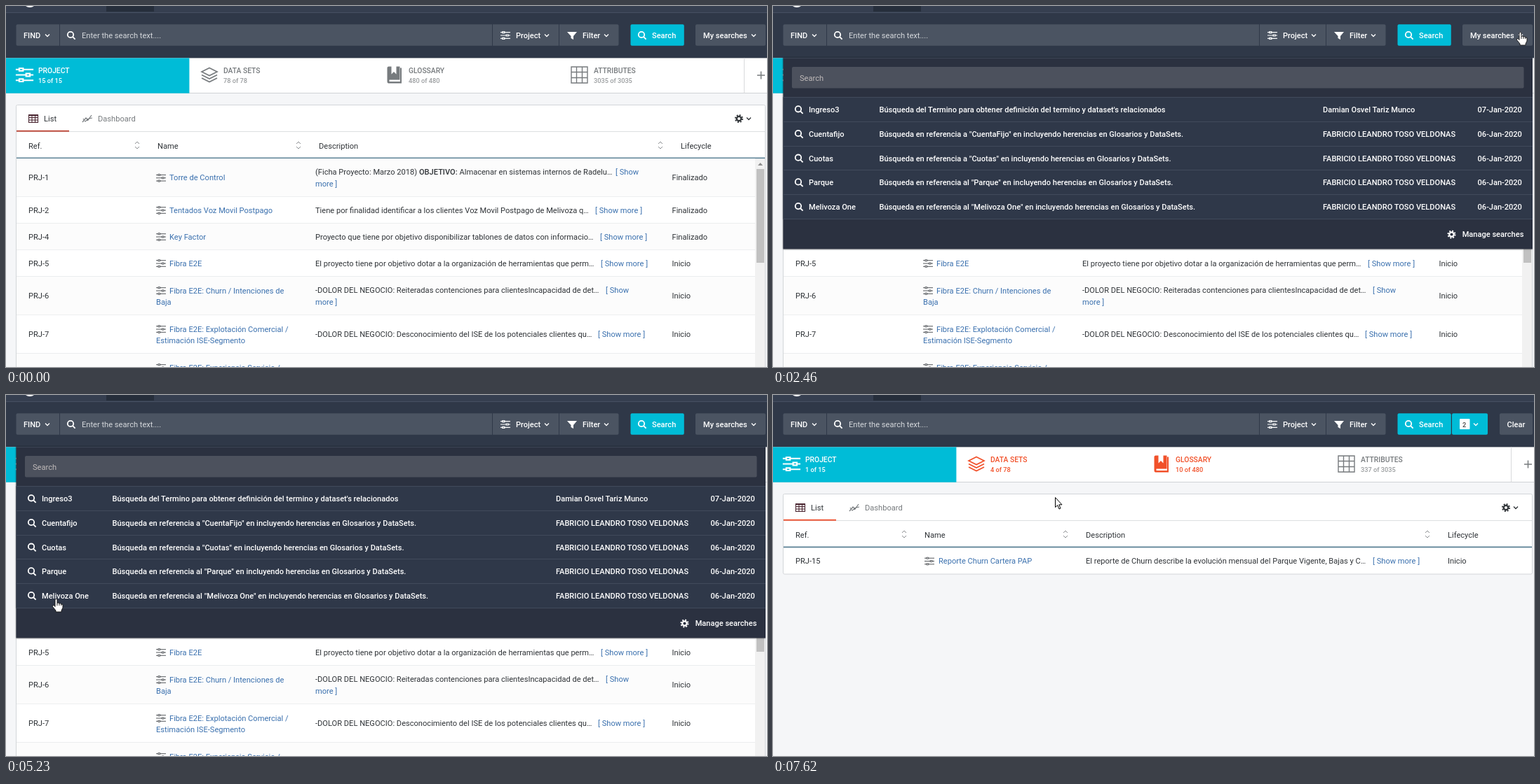
An HTML page for the animation above (8000 ms loop, 1085 by 516 pixels).

```html
<!DOCTYPE html>
<html lang="en">
<head>
<meta charset="utf-8">
<style>
html, body { margin: 0; width: 100%; height: 100%; overflow: hidden; background: #f5f6f8; }
svg { display: block; width: 1085px; height: 516px; }
text { font: 11.1px Roboto, sans-serif; fill: currentColor; white-space: pre; }
.m { font-weight: 500; font-size: 11.05px; }
.title { font-weight: 500; font-size: 10.3px; }
.count { font-weight: 500; font-size: 9.2px; }
.icon { fill: none; stroke: currentColor; }
#panel { filter: drop-shadow(0 0 1.2px #0008); }
#overlay { clip-path: inset(0 2px 0 0) view-box; }
</style>
</head>
<body>
<svg id="stage" viewBox="0 0 1085 516"></svg>
<script>
const LOOP = 8000;
const CYAN = '#00bcd7', LINK = '#3a70ae', INK = '#2f3337', GREY = '#777b7e', ORANGE = '#f1512a', BUTTON = '#4b5462';

const box = (x, y, w, h, fill, extra = '') => `<rect x="${x}" y="${y}" width="${w}" height="${h}" fill="${fill}" ${extra}/>`;
const button = (x, w, fill) => box(x, 26.3, w, 30.4, fill, 'rx="2"');
// y is the middle of the line of text
const text = (x, y, s, color = 'currentColor', cls = '') =>
  `<text x="${x}" y="${y + 4}" class="${cls}" style="fill:${color}">${s}</text>`;
const group = (id, body, color = INK) => `<g id="${id}" style="color:${color}">${body}</g>`;
const icon = (x, y, d, color = 'currentColor', width = 1.3, scale = 1) =>
  `<path class="icon" transform="translate(${x} ${y}) scale(${scale})" d="${d}" style="stroke:${color};stroke-width:${width}"/>`;

// Icons are drawn around their own centre
const chevron = (x, y, c) => icon(x, y, 'M-3-1.5L0 1.5L3-1.5', c);
const lens = (x, y, c = '#fff') => icon(x, y, 'M2.4 2.4L5.6 5.6M3.2-1A4.2 4.2 0 1 1-5.2-1A4.2 4.2 0 1 1 3.2-1', c, 1.8);
const sliders = (x, y, c = '#54585c', scale = 1, w = 1) => icon(x, y,
  'M-7-4.3H-4.2M-1.2-4.3H7M-7 0H1.2M4.2 0H7M-7 4.3H-4.2M-1.2 4.3H7' +
  'M-4.2-5.3H-1.2V-3.3H-4.2ZM1.2-1H4.2V1H1.2ZM-4.2 3.3H-1.2V5.3H-4.2Z', c, w, scale);
const sorter = x => icon(x, 199, 'M-3-2L0-5L3-2M-3 2L0 5L3 2', '#8a8d90', 1);
const gear = (x, y, c) =>
  `<g class="icon" style="stroke:${c}"><circle cx="${x}" cy="${y}" r="3.2" stroke-width="2.2"/>` +
  `<circle cx="${x}" cy="${y}" r="5" stroke-width="2" stroke-dasharray="1.963"/></g>`;
const grid = (x, y, c) => icon(x, y, 'M-11.5-11.5H11.5V11.5H-11.5ZM-4-11.5V11.5M4-11.5V11.5M-11.5-4H11.5M-11.5 4H11.5', c, 1.4);
const layers = (x, y) => icon(x, y, 'M0-10L11-4.5L0 1L-11-4.5ZM-11 0L0 5.5L11 0M-11 4.5L0 10L11 4.5', 'currentColor', 1.7);
const book = (x, y) =>
  `<path transform="translate(${x} ${y})" fill="currentColor" d="M-8-12H-4V-1L-.5-4.5L3-1V-12H8V7H-7V9.5H8.5V-10H10.5V12H-8Q-10 12-10 9V-10Q-10-12-8-12Z"/>`;

const tab = (id, x, title, count, art, color) =>
  group(id, art + text(x, 92.2, title, 'currentColor', 'title') +
    `<g opacity="${color === GREY ? .75 : 1}">${text(x, 106, count, 'currentColor', 'count')}</g>`, color);

const tabs = (id, counts, active) => group(id,
  tab('', 46, 'PROJECT', counts[0], sliders(26.5, 98.5, '#fff', 1.8, 1.2), '#fff') +
  tab('', 310, 'DATA SETS', counts[1], layers(290, 98.5), active) +
  tab('', 574, 'GLOSSARY', counts[2], book(553.5, 98.5), active) +
  tab(id + 'Attributes', 838, 'ATTRIBUTES', counts[3], grid(817.5, 98.5), GREY));

function header() {
  return box(0, 0, 1085, 75, '#2f3848') + box(0, 0, 1085, 9, '#363f50') + box(143, 0, 68, 8, '#262e3b') +
    box(0, 9, 1085, 1, '#465062') + '<circle cx="34" cy="-8" r="10" fill="#fff"/>' +
    button(14.5, 859, BUTTON) +
    [76, 693, 788].map(x => box(x, 26, 1, 31, '#2f3848')).join('') +
    text(25, 42, 'FIND', '#fff', 'm') + chevron(59, 42, '#fff') +
    lens(93, 42) + text(108, 42, 'Enter the search text....', '#d5d8dc') +
    sliders(712, 42, '#fff', 1, 1.2) + text(727, 42, 'Project', '#fff', 'm') + chevron(771, 42, '#fff') +
    '<path d="M800 37H814L809 43V48L805.500 46V43Z" fill="#fff"/>' +
    text(822, 42, 'Filter', '#fff', 'm') + chevron(856, 42, '#fff') +
    button(890.5, 76.3, CYAN) + lens(907, 42) + text(921, 42, 'Search', '#fff', 'm');
}

const tabBar = () => box(0, 74.4, 1085, 50.3, '#fff') + box(0, 124, 1085, 1, '#d0d3d6') +
  box(0, 74.4, 261.4, 50.3, CYAN) + box(1052, 74.4, 1, 50, '#d8dadc') + icon(1076.5, 99, 'M-5.500 0H5.500M0-5.500V5.500', GREY, 1.5);

function card(height, accent) {
  return box(14.5, 141.5, 1068, height, '#fff', 'stroke="#d3d6d9" rx="2"') +
    icon(39, 161, 'M-6.500-5.500H6.500V5.500H-6.500ZM-6.500-4.500H6.500M-6.500-1.500H6.500M-6.500 2H6.500M-2-5V5.500M2.500-5V5.500', '#4a2631', 1.1) +
    text(54, 161, 'List') +
    icon(116, 161, 'M-7 5L-2-1L1 2L6-5M-6 0L-3 4L2 0L7-1', GREY, 1.2) + text(131, 161, 'Dashboard', GREY) +
    gear(1045, 161, INK) + chevron(1059, 161, INK) +
    box(15, 179, 1067, 1, '#dcdfe1') + box(15, 177.8, 75, 1.8, accent) +
    text(32, 200, 'Ref.', INK) + text(216, 200, 'Name') + text(446, 200, 'Description') + text(962, 200, 'Lifecycle') +
    [187, 417, 933].map(sorter).join('') + box(15, 216.5, 1067, 1.8, '#5d8296');
}

// [top, height, ref, name lines, description, x of the link, stage, link wraps]
const rows = [
  [218, 54.5, 'PRJ-1', ['Torre de Control'], '(Ficha Proyecto: Marzo 2018) <tspan font-weight="500">OBJETIVO:</tspan> Almacenar en sistemas internos de Radelu…', 869, 'Finalizado', true],
  [272.5, 38, 'PRJ-2', ['Tentados Voz Movil Postpago'], 'Tiene por finalidad identificar a los clientes Voz Movil Postpago de Melivoza q…', 840, 'Finalizado'],
  [310.5, 38, 'PRJ-4', ['Key Factor'], 'Proyecto que tiene por objetivo disponibilizar tablones de datos con informacio…', 847, 'Finalizado'],
  [348.5, 38, 'PRJ-5', ['Fibra E2E'], 'El proyecto tiene por objetivo dotar a la organización de herramientas que perm…', 848, 'Inicio'],
  [386.5, 55, 'PRJ-6', ['Fibra E2E: Churn / Intenciones de', 'Baja'], '-DOLOR DEL NEGOCIO: Reiteradas contenciones para clientesIncapacidad de det…', 855, 'Inicio', true],
  [441.5, 55, 'PRJ-7', ['Fibra E2E: Explotación Comercial /', 'Estimación ISE-Segmento'], '-DOLOR DEL NEGOCIO: Desconocimiento del ISE de los potenciales clientes qu…', 844, 'Inicio'],
  [496.5, 55, '', ['Fibra E2E: Experiencia Servicio /'], '', 0, '']
];

function row([top, height, ref, names, about, linkX, stage, wraps], i) {
  const mid = top + height / 2;
  const nameY = names[1] || !ref ? mid - 7.5 : mid;
  const aboutY = wraps ? mid - 8 : mid;
  return box(15, top, 1053, height, i % 2 ? '#fff' : '#fcfcfc') + box(15, top + height - .5, 1053, 1, '#dcdfe1') +
    text(32, mid, ref) + sliders(221, nameY + .5) + text(233, nameY, names[0], LINK) +
    text(214, nameY + 16.5, names[1] || '', LINK) + text(441, aboutY, about) +
    (linkX ? text(linkX, aboutY, wraps ? '[ Show' : '[ Show more ]', LINK) : '') +
    (wraps ? text(441, aboutY + 16.5, 'more ]', LINK) : '') + text(949.5, mid, stage);
}

const fullList = () => card(390, '#bd4030') + rows.map(row).join('') +
  box(1068, 218.5, 14, 300, '#f1f1f1') + box(1070, 233, 11, 134, '#c1c1c1') + '<path d="M1072 228L1075.500 224L1079 228Z" fill="#8d8d8d"/>';

const shortList = () => card(114.5, '#ee4a27') + text(32, 237, 'PRJ-15') + sliders(223, 237.5) +
  text(236, 237, 'Reporte Churn Cartera PAP', LINK) +
  text(446, 237, 'El reporte de Churn describe la evolución mensual del Parque Vigente, Bajas y C…') +
  text(855, 237, '[ Show more ]', LINK) + text(962, 237, 'Inicio');

function panel() {
  const about = (link, name) => `Búsqueda en referencia ${link} "${name}" en incluyendo herencias en Glosarios y DataSets.`;
  const owner = 'FABRICIO LEANDRO TOSO VELDONAS';
  const searches = [
    ['Ingreso3', "Búsqueda del Termino para obtener definición del termino y dataset's relacionados", 'Damian Osvel Tariz Munco', '07'],
    ['Cuentafijo', about('a', 'CuentaFijo'), owner, '06'],
    ['Cuotas', about('a', 'Cuotas'), owner, '06'],
    ['Parque', about('al', 'Parque'), owner, '06'],
    ['Melivoza One', about('al', 'Melivoza One'), owner, '06']
  ];
  const strip = (y, h, fill) => box(14.5, y, 1068.5, h, fill);
  return strip(74.4, 273, '#2b3140') + strip(74, 1, '#3d4657') +
    box(27, 87, 1043.500, 30.5, '#4c515d', 'rx="2"') + text(38, 103, 'Search', '#bfbab9') +
    strip(130.5, 173.5, '#2f3849') +
    searches.map(([name, info, who, day], i) => {
      const y = 148.3 + i * 34.7;
      return strip(Math.round(y - 18), 1, '#414a5b') + lens(37, y) +
        [[51, name], [151.5, info], [784, who], [1004.6, day + '-Jan-2020']].map(([x, s]) => text(x, y, s, '#fff', 'm')).join('');
    }).join('') +
    strip(304, 1, '#414a5b') + gear(967.5, 326.5, '#fff') + text(982.7, 326.2, 'Manage searches', '#fff', 'm');
}

const stage = document.getElementById('stage');
stage.innerHTML = box(0, 0, 1085, 516, '#f5f6f8') + header() + tabBar() +
  group('mine', button(983, 100, BUTTON) + text(994, 42, 'My searches', '#fff', 'm') + chevron(1066, 42, '#fff')) +
  group('filtered', button(968, 51, CYAN) + box(979, 34, 14.5, 15, '#fff', 'rx="1"') +
    text(983, 42, '2', '#444', 'count') + chevron(1002, 42, '#fff') +
    button(1036, 47, BUTTON) + text(1046.5, 42, 'Clear', '#fff', 'm')) +
  tabs('allTabs', ['15 of 15', '78 of 78', '480 of 480', '3035 of 3035'], GREY) +
  tabs('someTabs', ['1 of 15', '4 of 78', '10 of 480', '337 of 3035'], ORANGE) +
  group('full', fullList()) + group('short', shortList()) + group('overlay', group('panel', panel())) +
  '<g id="cursor"><circle id="click" cx="-2" cy="0" r="10" fill="#ff0" fill-opacity=".47"/>' +
  '<path id="arrow" d="M.5.5V14.500L3.700 11.500L6 17L8 16L5.800 10.800H10Z" fill="#fff" stroke="#000"/>' +
  '<path id="hand" d="M-2 1.500Q-.5-.8 1 1.500V6.500Q3 5.300 4 7Q6 6 6.800 8Q9 7.500 9 9.500V13L7 17V19H-1V17L-5.500 11.500Q-5.800 9-4 9.500L-2 11.500ZM1 6.500V10M4 7V10M6.800 8V10" fill="#fff" stroke="#111" stroke-width=".9"/></g>';

const $ = id => document.getElementById(id);
const show = (id, on) => { $(id).style.display = on ? '' : 'none'; };
const between = (t, a, b) => t >= a && t < b;

// Pointer hops: [first hop, last hop, hops, x, y]
const moves = [
  [290, 1060, 11, 1062, 44], [1140, 1220, 2, 1065, 39], [2060, 2060, 1, 1066, 37],
  [2840, 3610, 11, 127, 131], [3690, 3690, 1, 90, 148], [3770, 4460, 10, 69, 201],
  [4530, 5230, 10, 72, 291], [5610, 5990, 6, 74, 252], [6220, 6220, 1, 75, 252],
  [6990, 6990, 1, 73, 250], [7310, 7620, 5, 402, 146]
];

function pointer(t) {
  let x = 950, y = 510;
  for (const [start, end, hops, toX, toY] of moves) {
    if (t < start) break;
    const gap = (end - start) / (hops - 1) || 1;
    const k = Math.min(hops, Math.floor((t - start) / gap + 1.001)) / hops;
    x += (toX - x) * k;
    y += (toY - y) * k;
  }
  return [x, y];
}

function draw(now) {
  const t = now % LOOP;
  const done = t >= 6990;
  show('panel', between(t, 2460, 6910));
  show('mine', t < 6910);
  show('filtered', t >= 6910);
  show('allTabs', !done);
  show('someTabs', done);
  show('full', !done);
  show('short', done);

  const hover = Math.max(0, Math.min(1, (t - 900) / 80, (1220 - t) / 160));
  $('allTabsAttributes').style.color = `color-mix(in srgb, #44484c ${hover * 100}%, ${GREY})`;

  const [x, y] = pointer(t);
  const hand = between(t, 1060, 2840) || between(t, 3690, 6990);
  show('cursor', t >= 290);
  show('hand', hand);
  show('arrow', !hand);
  show('click', between(t, 2230, 2380) || between(t, 6530, 6680));
  $('cursor').setAttribute('transform', `translate(${Math.round(x)} ${Math.round(y)})`);
  requestAnimationFrame(() => draw(performance.now()));
}
draw(performance.now());
</script>
</body>
</html>
```
